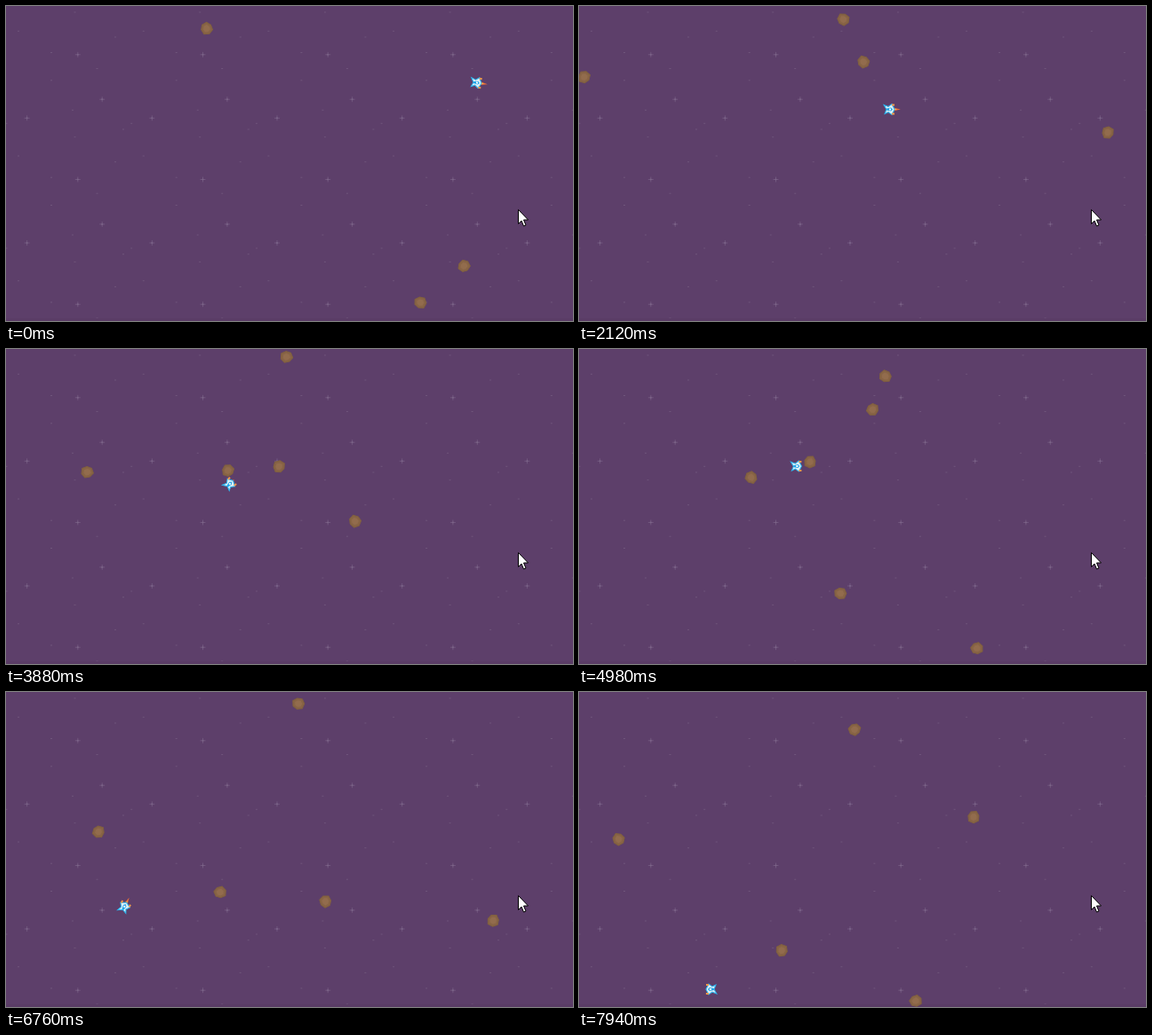
Recreate the animation shown at these times as an HTML page with a canvas. Size 638 by 355 pixels, loop 8000 ms.

```html
<!DOCTYPE html>
<html lang="en">
<head>
<meta charset="utf-8">
<title>Asteroid field</title>
<style>
  html, body { margin: 0; width: 100%; height: 100%; overflow: hidden; background: #5d3f6a; }
  canvas { display: block; }
</style>
</head>
<body>
<canvas id="stage" width="638" height="355"></canvas>
<script>
const ctx = document.getElementById('stage').getContext('2d');
const WIDTH = 638, HEIGHT = 355, LOOP = 8000, STEP = 73.6, TILE = 140.7;
const EMITTER = { x: 319, y: 2, first: .046, interval: .472 };
const RADIAN = Math.PI / 180;

const bigStars = [[80.8, 54.8], [108.2, 105.2], [23.6, 126.3]];
const smallStars = [[77.5, 7], [14, 28.3], [123, 35], [51, 52.5], [102.5, 70.5],
                    [51, 83.8], [75, 117.3], [.5, 132.3], [132, 139]];

// The emitter fires a rock from one point on a steady beat.
// Each bounce gives a rock a new heading (degrees) and speed (px/s).
function rock(beat, heading, speed, ...bounces) {
  const born = EMITTER.first + beat * EMITTER.interval;
  return { born, legs: [{ at: born, heading, speed }, ...bounces] };
}

const rocks = [
  rock(-6, 56, 126), rock(-5, 66.1, 157), rock(-2, 166, 107), rock(0, 27, 149.4),
  rock(3, 89, 92.7, { at: 2.57, heading: 155.5, speed: 59.4 }, { at: 3.88, heading: 172, speed: 51.2 }),
  rock(4, 149, 136), rock(5, 69, 139), rock(6, 95.2, 130),
  rock(8, 115.3, 119, { at: 4.98, heading: 101, speed: 56.8 }),
  rock(9, 80.2, 96.5), rock(10, 48.1, 172.5), rock(14, 48, 146), rock(16, 102.4, 122.7)
];

function rockPosition({ legs }, time) {
  let { x, y } = EMITTER;
  legs.forEach(({ at, heading, speed }, i) => {
    const until = i + 1 < legs.length ? legs[i + 1].at : Infinity;
    const distance = speed * Math.max(0, Math.min(time, until) - at);
    x += distance * Math.cos(heading * RADIAN);
    y += distance * Math.sin(heading * RADIAN);
  });
  return [x, y];
}

// seconds, x, y, tail direction in degrees
const shipKeys = [
  [0, 530, 86.5, 8], [.86, 446, 104.5, -25], [2.12, 350, 116.5, 0], [3.88, 252, 152, -45],
  [4.98, 246, 131.5, 0], [6.76, 133, 242, -62], [7.94, 148, 335.5, -180]
];

function sample(keys, time) {
  let i = 1;
  while (i < keys.length - 1 && time > keys[i][0]) i++;
  const a = keys[i - 1], b = keys[i], k = (time - a[0]) / (b[0] - a[0]);
  return a.map((v, j) => v + (b[j] - v) * k);
}

function polygon(points, fill, stroke) {
  ctx.beginPath();
  points.forEach(([x, y]) => ctx.lineTo(x, y));
  ctx.closePath();
  ctx.fillStyle = fill;
  ctx.fill();
  if (stroke) { ctx.strokeStyle = stroke; ctx.stroke(); }
}

function placed(x, y, angle, draw) {
  ctx.save();
  ctx.translate(x, y);
  ctx.rotate(angle);
  draw();
  ctx.restore();
}

function plus(x, y, arm, color) {
  ctx.fillStyle = color;
  ctx.fillRect(x - arm, y - .5, 2 * arm, 1);
  ctx.fillRect(x - .5, y - arm, 1, 2 * arm);
}

function drawSky() {
  ctx.fillStyle = '#5d3f6a';
  ctx.fillRect(0, 0, WIDTH, HEIGHT);
  for (let left = 0; left < WIDTH; left += TILE) {
    for (let top = 0; top < HEIGHT; top += TILE) {
      for (const [x, y] of bigStars) {
        plus(left + x, top + y, 3, '#71577e');
        plus(left + x, top + y, 1, '#7d6589');
      }
      ctx.fillStyle = '#6f557b';
      for (const [x, y] of smallStars) ctx.fillRect(left + x - 1, top + y - .5, 2, 1);
    }
  }
  ctx.fillStyle = '#5a3c66';
  ctx.fillRect(0, HEIGHT - 3, WIDTH, 3);
}

function rockShape(size) {
  return Array.from({ length: 7 }, (_, i) => {
    const angle = i * 2 * Math.PI / 7, radius = size * (1 + .08 * Math.cos(i * 2.3));
    return [radius * Math.cos(angle), radius * Math.sin(angle)];
  });
}

function drawRock(x, y, angle) {
  placed(x, y, angle, () => {
    polygon(rockShape(6.6), '#886445', '#80603f');
    polygon(rockShape(4), '#926c4d');
  });
}

function drawShip(time) {
  const [, x, y, tail] = sample(shipKeys, time);
  const flame = Math.cos(2 * Math.PI * time / 2.2);
  placed(x, y, tail * RADIAN, () => {
    if (flame > .1) {
      polygon([[3, -2], [6 + 6 * flame, 0], [3, 2]], '#ef7038');
      polygon([[3, -1], [5 + 3 * flame, 0], [3, 1]], '#ffd04a');
    }
    polygon([[-7, -5], [-2, -3], [2, -6], [4, -2], [5, 0], [4, 2], [2, 6], [-2, 3], [-6, 5], [-4, 0]],
            '#e2f0f5', '#2ab6f0');
    polygon([[-4, -1], [1, -2], [3, 0], [1, 2], [-4, 1]], '#1ea6ea');
    ctx.fillStyle = '#f39a4a';
    ctx.fillRect(2, -6, 3, 2);
    ctx.fillRect(2, 4, 3, 2);
    ctx.fillStyle = '#fff';
    ctx.fillRect(-1, -1, 2, 2);
  });
}

function drawCursor() {
  placed(576.5, 229.5, 0, () =>
    polygon([[0, 0], [0, 16], [3.5, 12.5], [6, 18.5], [8.5, 17.5], [6, 11.5], [11, 11.5]], '#fff', '#000'));
}

function render(elapsed) {
  const frame = Math.floor((elapsed % LOOP + 25) / STEP);
  const time = Math.max(0, frame * STEP - 15) / 1000;
  drawSky();
  rocks.forEach((item, i) => {
    if (time < item.born) return;
    drawRock(...rockPosition(item, time), i + time * (i % 2 ? 1.3 : -1.1));
  });
  drawShip(time);
  drawCursor();
}

const start = performance.now();
function tick() {
  render(performance.now() - start);
  requestAnimationFrame(tick);
}
tick();
</script>
</body>
</html>
```
